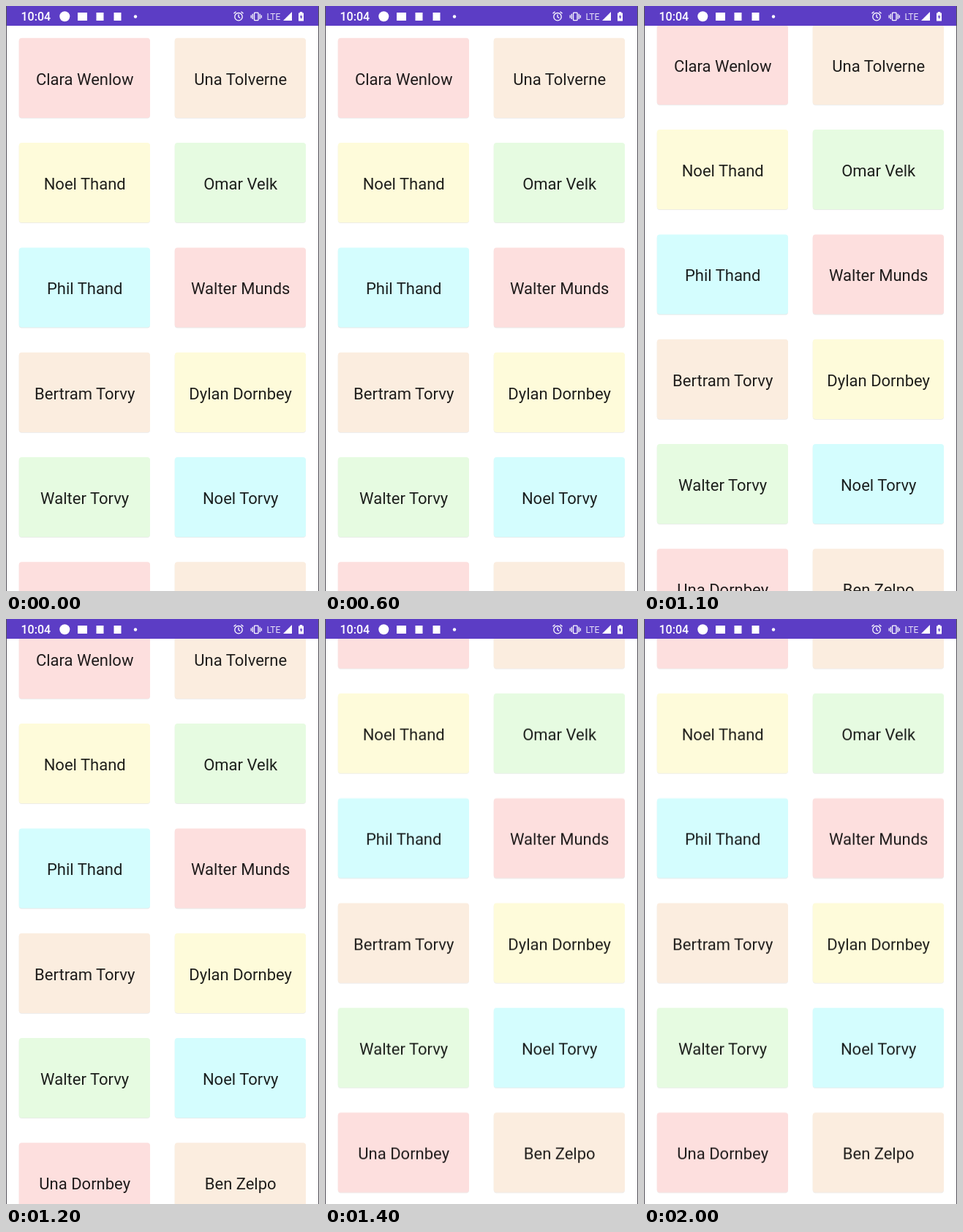
An HTML page that plays this animation: 428x800 px, repeating every 2.1 s.

```html
<!DOCTYPE html>
<html lang="en">
<head>
<meta charset="utf-8">
<title>Name grid</title>
<style>
  html, body { margin: 0; width: 100%; height: 100%; overflow: hidden; background: #fff; }
  svg { display: block; width: 428px; height: 800px; }
  text { font-family: Roboto, sans-serif; }
  .name { font-size: 22px; text-anchor: middle; fill: #000; fill-opacity: .88; }
  .shadow { fill: #000; fill-opacity: .09; }
  #list { animation: scroll 2100ms step-end infinite; }
  /* The fling slows down, then stops hard at the end of the list. */
  @keyframes scroll {
    0% { transform: translateY(0); }
    52.37% { transform: translateY(-18px); }
    57.13% { transform: translateY(-44px); }
    61.89% { transform: translateY(-67px); }
    66.65%, 100% { transform: translateY(-85.3px); }
  }
</style>
</head>
<body>
<svg viewBox="0 0 428 800">
  <rect width="428" height="800" fill="#fff"/>
  <g id="list"></g>
  <path d="M.5 0V800M427.5 0V800" stroke="#55535a"/>

  <rect x="1" width="426" height="27" fill="#5c3dc5"/>
  <g fill="#fff">
    <text x="20.5" y="20" font-size="16" font-weight="500">10:04</text>
    <circle cx="80.3" cy="14.3" r="7"/>
    <rect x="98" y="9" width="13" height="11"/>
    <rect x="123.500" y="9" width="10" height="11"/>
    <rect x="147.500" y="9" width="10" height="11"/>
    <circle cx="177" cy="14.500" r="2.200"/>
    <text x="356.500" y="18.500" font-size="12" fill-opacity=".85">LTE</text>
    <path d="M391 8V20H379Z"/>
    <path d="M400 9.500H401.800V8H405.200V9.500H407V20.500H400Z"/>
  </g>
  <path d="M404 11.500L401.800 15.500H403.300V18.500L405.400 14.300H404Z" fill="#5c3dc5"/>
  <g fill="none" stroke="#fff" stroke-width="1.300">
    <circle cx="318" cy="14.700" r="5.200"/>
    <path d="M318 11.500V15L320.300 16.500M311.500 10.300L314.500 7.800M324.500 10.300L321.500 7.800"/>
    <rect x="339.500" y="9.200" width="5.500" height="10.500" rx=".8"/>
    <path d="M337.300 10.800V18M335.200 12.500V16.500M347.200 10.800V18M349.300 12.500V16.500"/>
  </g>
</svg>
<script>
  const names = [
    'Clara Wenlow', 'Una Tolverne', 'Noel Thand', 'Omar Velk',
    'Phil Thand', 'Walter Munds', 'Bertram Torvy', 'Dylan Dornbey',
    'Walter Torvy', 'Noel Torvy', 'Una Dornbey', 'Ben Zelpo'
  ];
  const colors = ['#fddfde', '#fbeddf', '#fefbda', '#e6fbe1', '#d4fdfe'];
  const list = document.getElementById('list');

  function add(tag, attrs, content = '') {
    const node = document.createElementNS(list.namespaceURI, tag);
    for (const key in attrs) node.setAttribute(key, attrs[key]);
    node.textContent = content;
    list.append(node);
  }

  names.forEach((name, i) => {
    const x = 17.7 + (i % 2) * 213;
    const y = 43.8 + Math.floor(i / 2) * 143.3;
    const card = { x, width: 179.3, height: 109.2, rx: 4 };
    add('rect', { ...card, y: y + 0.8, class: 'shadow' });
    add('rect', { ...card, y, fill: colors[i % colors.length] });
    add('text', { x: x + 90, y: y + 64, class: 'name' }, name);
  });
</script>
</body>
</html>
```
